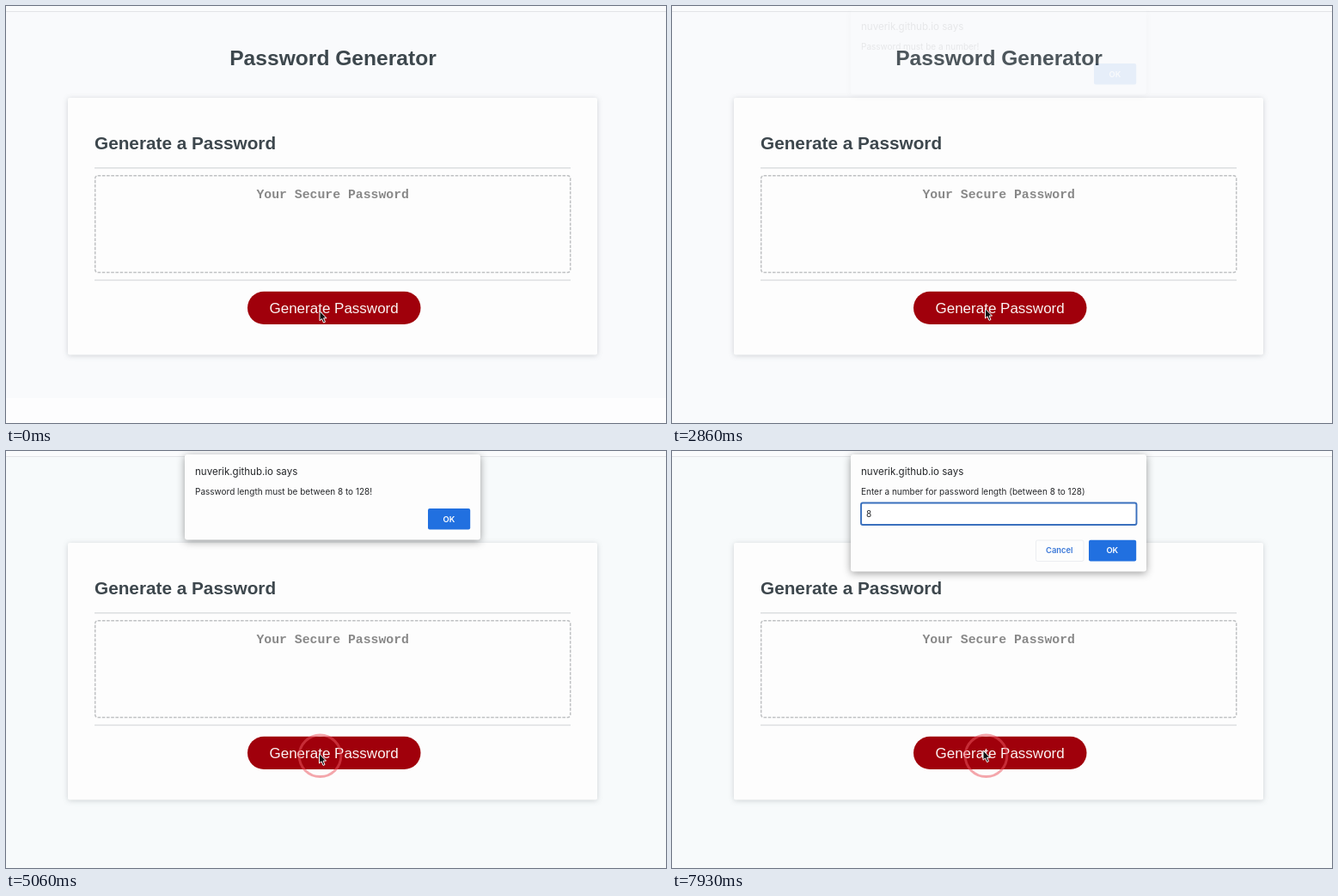
These frames come from a looping animation (768 by 486 pixels, 8000 ms). An HTML page:

```html
<!DOCTYPE html>
<html lang="en">
<head>
<meta charset="utf-8">
<title>Password Generator</title>
<style>
  html, body { margin: 0; width: 100%; height: 100%; overflow: hidden; background: #f9fafc; }
  svg { display: block; width: 100%; height: 100%; }
  .page { font-family: "Liberation Sans", Arial, sans-serif; }
  .heading { font-weight: 700; fill: #3d474d; }
  .dialog { font-family: Inter, Roboto, sans-serif; font-size: 10px; fill: #26282b; }
  .label { font-size: 9.4px; font-weight: 600; text-anchor: middle; }
  .card { filter: drop-shadow(0 1px 3px rgba(40, 50, 60, .2)); }
  .panel { fill: #fdfdfd; filter: drop-shadow(0 2px 5px rgba(0, 0, 0, .38)); }
</style>
</head>
<body>
<svg viewBox="0 0 768 486">
  <rect id="backdrop" width="768" height="486"/>
  <rect id="footer" y="457" width="768" height="29" fill="#fdfdfe"/>
  <rect width="768" height="6" fill="#fafbfc"/>
  <rect y="6" width="768" height="1" fill="#e2e4e7"/>

  <g class="page">
    <text class="heading" x="380.5" y="69" font-size="24.6" text-anchor="middle">Password Generator</text>
    <rect class="card" x="72" y="107" width="616" height="299.5" rx="2" fill="#fdfdfd"/>
    <text class="heading" x="103" y="166.5" font-size="20.75">Generate a Password</text>
    <path d="M103 188.7H657M103 319.5H657" stroke="#dcdee0" stroke-width="1.4"/>
    <rect x="103.7" y="197.8" width="553" height="112.7" rx="3" fill="none"
          stroke="#bfc1c3" stroke-width="1.5" stroke-dasharray="3.6 1.6"/>
    <text x="380.2" y="224" font-size="14.8" font-weight="700" fill="#888" text-anchor="middle"
          font-family="'Liberation Mono', 'Courier New', monospace">Your Secure Password</text>
    <rect x="281" y="332.7" width="201.5" height="38.3" rx="19.1" fill="#a0000b"/>
    <text x="381.6" y="357.5" font-size="17" fill="#fbf3f3" text-anchor="middle">Generate Password</text>
  </g>

  <g id="prompt" class="dialog">
    <rect class="panel" x="208" y="4" width="344" height="136.5" rx="3"/>
    <text x="220" y="28.2" font-size="11.55">nuverik.github.io says</text>
    <text x="220" y="50.8">Enter a number for password length (between 8 to 128)</text>
    <rect x="220" y="60.5" width="320.5" height="25.5" rx="2" fill="#fff" stroke="#3a70bd" stroke-width="1.9"/>
    <text id="entry" x="226" y="76.5"></text>
    <rect id="caret" y="67" width="1" height="11.5" fill="#444"/>
    <rect x="423.5" y="104" width="55.5" height="24.5" rx="2" fill="#fdfdfd" stroke="#eceef1"/>
    <text class="label" x="450.8" y="119.4" fill="#3b78d8">Cancel</text>
    <rect x="485" y="103.8" width="55.2" height="24.7" rx="2" fill="#2170e0"/>
    <text class="label" x="512.3" y="119.4" fill="#fff">OK</text>
  </g>

  <g id="alert" class="dialog">
    <rect class="panel" x="208" y="4" width="344" height="99.5" rx="3"/>
    <text x="220" y="28.2" font-size="11.55">nuverik.github.io says</text>
    <text id="message" x="220" y="50.8"></text>
    <rect x="491" y="67" width="49.2" height="24.5" rx="2" fill="#2170e0"/>
    <text class="label" x="515.5" y="82.5" fill="#fff">OK</text>
  </g>

  <circle id="ring" cx="365.5" cy="355.3" r="24.3" fill="none" stroke="#ec5660" stroke-opacity=".52" stroke-width="3"/>
  <path id="cursor" d="M0 0V11.2L2.5 9L4.5 13.6L6.5 12.7L4.6 8.3H8Z"
        fill="#111" stroke="#fff" stroke-width="1" stroke-linejoin="round"/>
</svg>

<script>
const LOOP = 8000, FADE = 110, BLINK = 500;
const el = Object.fromEntries([...document.querySelectorAll("[id]")].map(n => [n.id, n]));

// [open, close] for each dialog
const prompts = [[650, 2030], [3495, 4690], [6370, Infinity]];
const alerts = [[2130, 2760], [4790, 5420]];

// [start time, value]
const entries = [[0, ""], [1420, "a"], [1520, "ab"], [1620, "abc"], [3200, ""], [4030, "5"], [6000, ""], [7380, "8"]];
const messages = [[0, "Password must be a number!"], [4400, "Password length must be between 8 to 128!"]];
const backdrops = [[0, "#f9fafc"], [4400, "#f7fafb"]];
const cursors = [[0, [365, 355.5]], [930, [366, 356]], [1800, [364.5, 352.8]], [7600, [362, 349]]];

const stepAt = (steps, t) => steps.filter(([start]) => start <= t).at(-1);
const clamp = v => Math.min(1, Math.max(0, v));
const opacityAt = (spans, t) => Math.max(...spans.map(([open, close]) =>
  Math.min(clamp((t - open) / FADE), 1 - clamp((t - close) / FADE))));

function render(t) {
  const [typedAt, typed] = stepAt(entries, t);
  const opened = prompts.filter(([open]) => open <= t).at(-1)?.[0] ?? 0;
  const idle = t - Math.max(typedAt, opened);

  el.prompt.style.opacity = opacityAt(prompts, t);
  el.alert.style.opacity = opacityAt(alerts, t);
  el.entry.textContent = typed;
  el.caret.setAttribute("x", 226 + typed.length * 6.2);
  el.caret.style.opacity = idle % (2 * BLINK) < BLINK ? 1 : 0;
  el.message.textContent = stepAt(messages, t)[1];
  el.backdrop.setAttribute("fill", stepAt(backdrops, t)[1]);
  el.footer.style.opacity = t < 650 ? 1 : 0;
  el.ring.style.opacity = t < 3390 ? 0 : 1;
  el.cursor.setAttribute("transform", `translate(${stepAt(cursors, t)[1]})`);
}

const start = performance.now();
function tick(now) {
  render(Math.max(0, now - start) % LOOP);
  requestAnimationFrame(tick);
}
render(0);
requestAnimationFrame(tick);
</script>
</body>
</html>
```
